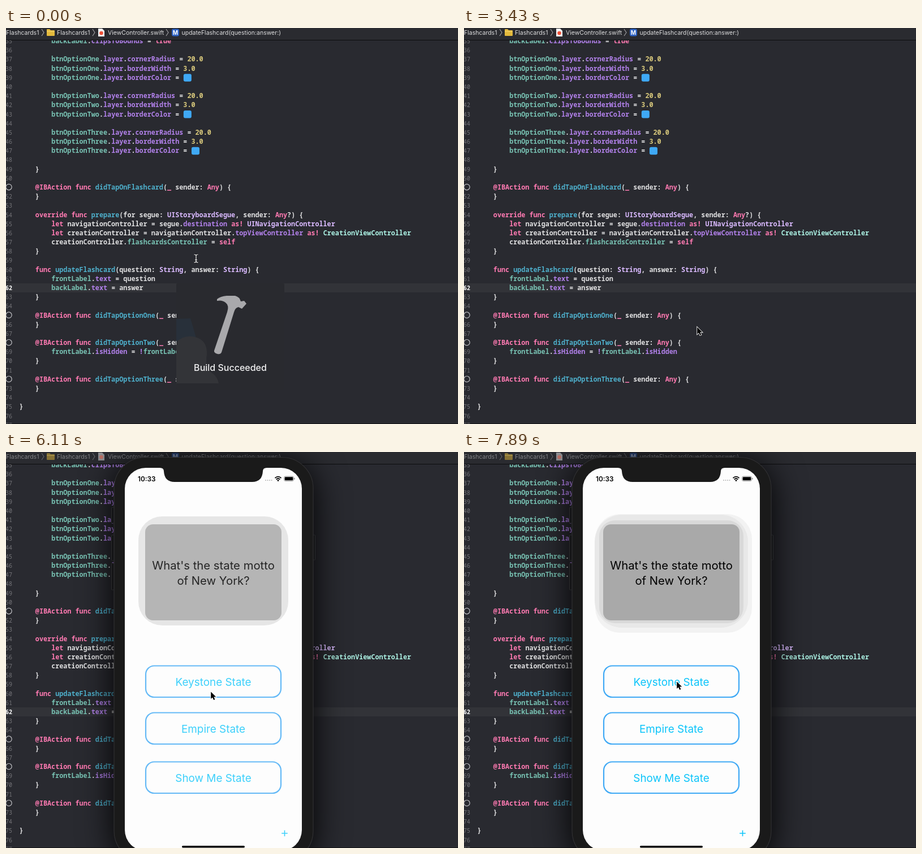
Write an HTML page with a canvas that moves like this. It is 799 px wide and 701 px high and loops after 8 s.

```html
<!DOCTYPE html>
<html lang="en">
<head>
<meta charset="utf-8">
<title>Flashcards</title>
<style>
  html, body { margin: 0; width: 100%; height: 100%; overflow: hidden; background: #292a30; }
  canvas { display: block; }
</style>
</head>
<body>
<canvas id="stage" width="799" height="701"></canvas>
<script>
const ctx = document.getElementById('stage').getContext('2d');
const LOOP = 8000, TICK = 148.9;
const FIRST_LINE = 35, LINE_HEIGHT = 16.184, CHAR = 7.067;
const MONO = '"Noto Sans Mono", "DejaVu Sans Mono", monospace';
const SANS = 'Inter, Roboto, sans-serif';

const option = name => [
  `        btnOption${name}.layer.cornerRadius = 20.0`,
  `        btnOption${name}.layer.borderWidth = 3.0`,
  `        btnOption${name}.layer.borderColor = ■`,
  ''];

const code = [
  '        backLabel.clipsToBounds = true',
  '',
  ...option('One'), ...option('Two'), ...option('Three'),
  '    }',
  '',
  '    @IBAction func didTapOnFlashcard(_ sender: Any) {',
  '    }',
  '',
  '    override func prepare(for segue: UIStoryboardSegue, sender: Any?) {',
  '        let navigationController = segue.destination as! UINavigationController',
  '        let creationController = navigationController.topViewController as! CreationViewController',
  '        creationController.flashcardsController = self',
  '    }',
  '',
  '    func updateFlashcard(question: String, answer: String) {',
  '        frontLabel.text = question',
  '        backLabel.text = answer',
  '    }',
  '',
  '    @IBAction func didTapOptionOne(_ sender: Any) {',
  '    }',
  '',
  '    @IBAction func didTapOptionTwo(_ sender: Any) {',
  '        frontLabel.isHidden = !frontLabel.isHidden',
  '    }',
  '',
  '    @IBAction func didTapOptionThree(_ sender: Any) {',
  '    }',
  '',
  '}',
  '', ''];

const syntax = [
  [/^(@IBAction|func|override|let|as!|self|true|Any|_)$/, '#ff7ab2', 700],
  [/^(layer|cornerRadius|border\w+|clipsToBounds|text|isHidden|destination|topViewController|!)$/, '#b281eb', 600],
  [/^(btn\w+|\w+Label|flashcardsController)$/, '#78c2b3', 600],
  [/^(didTap\w+|prepare|updateFlashcard)$/, '#4eb0cc', 600],
  [/^(UI\w+|String)$/, '#dabaff', 600],
  [/^CreationViewController$/, '#acf2e4', 600],
  [/^\d/, '#d9c97c', 600],
  [/./, '#dfdfe0', 600]];

// Each token keeps its column and style, worked out once.
const tokens = code.map(line =>
  [...line.matchAll(/\d+\.\d|@?\w+!?|[!■]|[^\w@!■\s]+/g)].map(m => {
    const [, color, weight] = syntax.find(([rule]) => rule.test(m[0]));
    return { word: m[0], column: m.index, color, weight };
  }));

function text(str, x, y, font, color, align = 'left') {
  ctx.font = font;
  ctx.fillStyle = color;
  ctx.textAlign = align;
  ctx.fillText(str, x, y);
}

function box(x, y, w, h, r, fill, stroke, lineWidth = 1) {
  ctx.beginPath();
  ctx.roundRect(x, y, w, h, r);
  if (fill) { ctx.fillStyle = fill; ctx.fill(); }
  if (stroke) { ctx.strokeStyle = stroke; ctx.lineWidth = lineWidth; ctx.stroke(); }
}

function shape(d, fill, stroke, lineWidth = 1) {
  const path = new Path2D(d);
  if (stroke) { ctx.strokeStyle = stroke; ctx.lineWidth = lineWidth; ctx.stroke(path); }
  if (fill) { ctx.fillStyle = fill; ctx.fill(path); }
}

function faded(alpha, draw) {
  ctx.save();
  ctx.globalAlpha *= alpha;
  draw();
  ctx.restore();
}

function drawEditor() {
  box(0, 0, 799, 701, 0, '#292a30');
  box(0, 452, 799, 16, 0, '#323338');
  tokens.forEach((line, i) => {
    const number = FIRST_LINE + i;
    const y = 55 + (number - 37) * LINE_HEIGHT;
    const baseline = Math.round(y + 4.4);
    if (code[i].includes('@IBAction')) {
      box(-0.2, y - 5.2, 10.4, 10.4, 5.2, null, '#c4c4c8', 1.2);
    } else {
      const current = number === 62;
      text(number, 11, baseline, `${current ? 600 : 400} 10px ${MONO}`, current ? '#fff' : '#747478', 'right');
    }
    for (const { word, column, color, weight } of line) {
      const x = 23.6 + column * CHAR;
      if (word === '■') box(x + 0.5, y - 6, 14, 13.5, 3, '#3fa9f5');
      else text(word, x, baseline, `${weight} 11.78px ${MONO}`, color);
    }
  });
  box(0, 700, 799, 1, 0, '#131417');
}

function drawPathBar(inactive) {
  box(0, 0, 799, 21, 0, '#2a2b30');
  box(0, 21, 799, 1, 0, '#0c0c0e');
  faded(inactive ? 0.5 : 1, () => {
    const font = `10.5px ${SANS}`, color = '#dededf';
    text('Flashcards1', 0, 11.5, font, color);
    text('Flashcards1', 90, 11.5, font, color);
    text('ViewController.swift', 180, 11.5, font, color);
    text('updateFlashcard(question:answer:)', 310.5, 11.5, font, color);
    for (const x of [63, 153, 283]) shape(`M${x} 2l4 6l-4 6`, null, '#a5a5a8', 1.1);
    shape('M72 3q0-1 1-1h4l2 2h6q1 0 1 1v8q0 1-1 1h-12q-1 0-1-1z', '#e3b93c');
    box(72, 5.5, 14, 1, 0, '#f6d976');
    shape('M163 1h7l4 4v10h-11z', '#f4f4f4');
    box(165.2, 5.8, 6.6, 6.6, 3.3, '#f05138');
    box(293, 1.5, 13, 13, 3, '#2d62c4');
    text('M', 299.5, 11.7, `700 10px ${SANS}`, '#fff', 'center');
  });
}

function drawBuildNotice() {
  box(301, 451, 191, 189, 4, '#292a2f');
  shape('M301 515L326 514Q331 530 336 548L301 562z', '#28303a');
  shape('M301 556Q318 540 340 549Q356 556 355 578Q351 604 366 612Q374 618 376 629H301z', '#333438');
  shape('M373 480Q379 475 390 474L405 474Q413 476 415 484L421 483L425 488L417 497L411 494' +
    'Q405 495 403 503L381 574Q379 578 374 577Q367 575 368 571L391 503Q395 491 388 486Q382 481 373 483z', '#a9a9ac');
  text('Build Succeeded', 396.5, 607, `500 16px ${SANS}`, '#f2f2f3', 'center');
}

function drawPhone() {
  for (const [x, y, h] of [[186.5, 98, 28], [186.5, 147, 45], [186.5, 197, 47], [541.5, 147, 44]])
    box(x, y, 5, h, 1, '#25262a', '#4b4b4f');
  ctx.save();
  ctx.shadowColor = '#000';
  ctx.shadowBlur = 60;
  ctx.shadowOffsetY = 8;
  box(191, 9.5, 352, 716, 55, '#1a1a1a');
  ctx.restore();
  box(191, 9.5, 352, 716, 55, null, '#303032', 1.2);
  box(210, 28, 313, 678, 37, '#fdfdfd');
  shape('M272 28Q279 28 279 34Q280 53 298 53H435Q453 53 454 34Q454 28 461 28z', '#1a1a1a');

  text('10:33', 233, 51.5, `600 11.8px ${SANS}`, '#000');
  for (let i = 0; i < 4; i++) box(458 + i * 3.5, 49, 2, 2, 1, '#b5b5b5');
  shape('M475.5 46.2Q481 41 486.5 46.2M477.6 48.6Q481 45.4 484.4 48.6', null, '#000', 1.8);
  shape('M479 50Q481 48.4 483 50L481 52.2z', '#000');
  box(491.5, 43, 17, 8.5, 2.5, null, '#8a8a8a', 0.8);
  box(492.7, 44.2, 14.6, 6.1, 1.4, '#000');
  box(509.3, 45.7, 1.2, 3, 0.6, '#8a8a8a');
}

// The card's soft shadow shows as flat bands that build up: left, top, right, bottom, radius, colour.
function shadowBands(n) {
  if (n < 44) return [[234, 114, 499, 307, 42, '#e1e1e1']];
  const bands = [[231, 111, 502, 311, 48, '#e8e8e8'], [239, 121, 494, 303, 28, '#d9d9d9']];
  return n < 51 ? bands : [[232, 110, 509, 320, 44, '#f2f2f2'], ...bands];
}

function drawApp(n) {
  for (const [l, t, r, b, radius, color] of shadowBands(n)) box(l, t, r - l, b - t, radius, color);
  box(246, 128, 241, 170, 14, '#a9a9a9');
  const cardFont = `20.3px ${SANS}`;
  text("What's the state motto", 366.5, 207.5, cardFont, '#000', 'center');
  text('of New York?', 366.5, 234.5, cardFont, '#000', 'center');

  const pressed = { 48: 0.2, 49: 0.6 }[n] ?? 1;
  [['Keystone State', 378.5, 1], ['Empire State', 461.5, pressed], ['Show Me State', 548.5, 1]]
    .forEach(([label, y, alpha]) => {
      box(247, y, 239, 55.5, 15, null, '#3fa9f5', 2.2);
      faded(alpha, () => text(label, 366.5, y + 35, `18.9px ${SANS}`, '#0cc4fa', 'center'));
    });
  shape('M487.2 675h10.6M492.5 669.7v10.6', null, '#0cc4fa', 1.6);
}

// Pointer stops: tick, x, y
const stops = [
  [0, 336, 408], [1, 336, 408], [8, 408, 537], [16, 408, 537], [17, 413, 530], [22, 413, 530],
  [23, 412, 529], [25, 412, 529], [28, 342, 469], [29, 342, 469], [31, 348, 430], [36, 348, 430],
  [39, 362, 424], [41, 362, 424], [46, 373, 490], [48, 373, 490], [53, 376, 406], [54, 376, 406]];

function pointerAt(n) {
  const i = Math.max(1, stops.findIndex(s => s[0] >= n));
  const [n0, x0, y0] = stops[i - 1], [n1, x1, y1] = stops[i];
  const p = (n - n0) / (n1 - n0), e = p * p * (3 - 2 * p);
  return [x0 + (x1 - x0) * e, y0 + (y1 - y0) * e];
}

function drawPointer(n) {
  ctx.save();
  ctx.translate(...pointerAt(n));
  if (n < 23) {
    const beam = 'M-3.5-7Q0-7 0-5Q0-7 3.5-7M0-6V6M-3.5 7Q0 7 0 5Q0 7 3.5 7M-2 2.5H2';
    shape(beam, null, '#0008', 2.4);
    shape(beam, null, '#fff', 1.2);
  } else {
    shape('M0.2 0.6V13L3 10.4L5.2 15L7.4 14L5.3 9.6H9.2z', '#000', '#fff', 1.7);
  }
  ctx.restore();
}

function render(now) {
  const n = Math.min(53, Math.floor((now % LOOP + 4) / TICK));
  const phoneShown = n >= 24;
  drawEditor();
  drawPathBar(phoneShown);
  const notice = Math.max(0, 1 - n * TICK / 1384);
  if (notice > 0) faded(notice, drawBuildNotice);
  if (phoneShown) drawPhone();
  if (n >= 41) faded(n === 41 ? 0.8 : 1, () => drawApp(n));
  if (phoneShown) box(311, 697, 111, 3.5, 1.7, '#000');
  drawPointer(n);
  requestAnimationFrame(frame);
}

const start = performance.now();
function frame() { render(performance.now() - start); }
frame();
</script>
</body>
</html>
```
